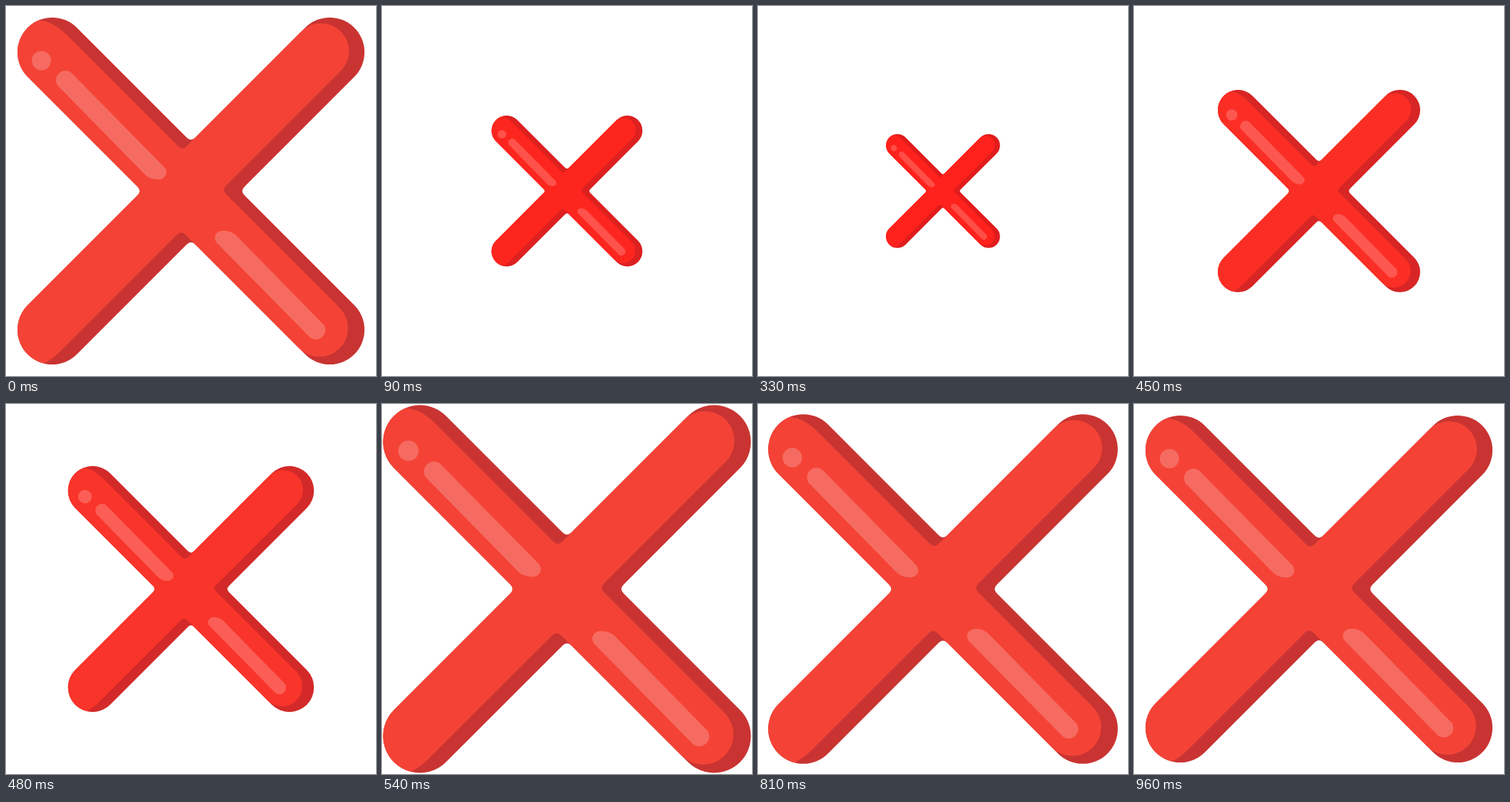
An HTML page for the animation above (1.77 s loop, 512 by 512 pixels).

```html
<!DOCTYPE html>
<html lang="en">
<head>
<meta charset="utf-8">
<title>Cross mark</title>
<style>
  html, body { margin: 0; width: 100%; height: 100%; overflow: hidden; background: #fff; }
  svg { display: block; width: 100%; height: 100%; }
</style>
</head>
<body>
<svg viewBox="0 0 512 512">
  <g id="cross">
    <path id="side" d="M30 98 A48 48 0 0 1 98 30 L250 182 Q256 188 262 182 L414 30
      A48 48 0 0 1 482 98 L330 250 Q324 256 330 262 L482 414
      A48 48 0 0 1 414 482 L262 330 Q256 324 250 330 L98 482
      A48 48 0 0 1 30 414 L182 262 Q188 256 182 250 Z"/>
    <path id="face" d="M30 98 A48 48 0 0 1 45 19.9 C60 20 75 30 88 44
      L238 194 Q244 200 250 194 L408.7 35.2
      A38.6 38.6 0 0 1 463.3 89.8 L304.5 248.5 Q298.5 254.5 304.5 260.5 L462 418
      A39.6 39.6 0 0 1 406 474 L248.5 316.5 Q242.5 310.5 236.5 316.5 L79 474
      C70 483 62 490 52 494.5 A48 48 0 0 1 30 414 L182 262 Q188 256 182 250 Z"/>
    <g id="shine">
      <circle cx="49" cy="75.5" r="13.3"/>
      <path id="streak" d="M71 109.5 L192 233 C198 239 206 240.5 213 240 C222 238 225 229 218 222
        L90 92 A13.2 13.2 0 0 0 71 109.5 Z"/>
      <use href="#streak" transform="rotate(180 255.5 275.5)"/>
    </g>
  </g>
</svg>
<script>
  const LOOP = 1770, STEP = 30;
  const LOW = 0.295, HIGH = 1.06;
  const LOW_AT = 216, HIGH_AT = 540, REST_AT = 960;

  // Colours at rest and at the small end of the pulse
  const tones = {
    side: [[201, 52, 50], [225, 28, 29]],
    face: [[244, 67, 54], [255, 33, 27]],
    shine: [[246, 107, 97], [255, 77, 72]]
  };

  const byId = id => document.getElementById(id);

  function scaleAt(t) {
    if (t < LOW_AT) return LOW + (1 - LOW) * (1 - t / LOW_AT) ** 3;
    if (t < HIGH_AT) return LOW + (HIGH - LOW) * ((t - LOW_AT) / (HIGH_AT - LOW_AT)) ** 3;
    if (t >= REST_AT) return 1;
    const u = t - HIGH_AT;
    return 1 + (HIGH - 1) * Math.exp(-0.007 * u) * Math.cos(Math.PI * u / 150);
  }

  function draw(time) {
    const t = Math.floor((time % LOOP) / STEP) * STEP;
    const s = scaleAt(t);
    const mix = Math.min(1, Math.max(0, (1 - s) / 0.67));
    byId("cross").setAttribute("transform", `translate(256 256) scale(${s}) translate(-256 -256)`);
    for (const [id, [rest, small]] of Object.entries(tones)) {
      const rgb = rest.map((c, i) => Math.round(c + (small[i] - c) * mix));
      byId(id).setAttribute("fill", `rgb(${rgb})`);
    }
  }

  const start = performance.now();
  function tick() {
    draw(performance.now() - start);
    requestAnimationFrame(tick);
  }
  tick();
</script>
</body>
</html>
```
